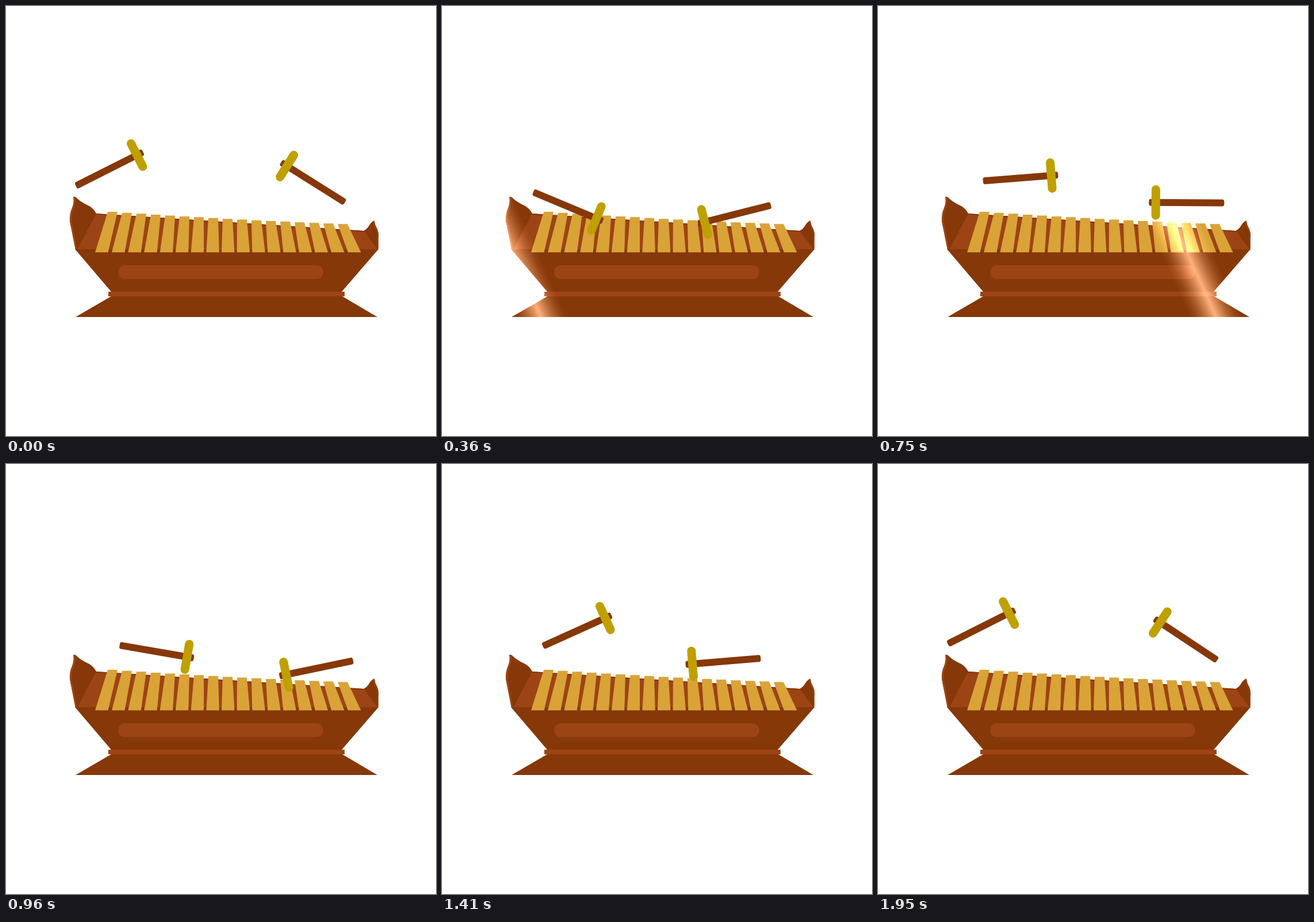
Animation of 748x748 px, one loop 2.25 s. Source, as an HTML page with a canvas:

```html
<!DOCTYPE html>
<html lang="en">
<head>
<meta charset="utf-8">
<title>Wooden xylophone</title>
<style>
html, body { margin: 0; width: 100%; height: 100%; overflow: hidden; background: #fff; }
canvas { display: block; }
</style>
</head>
<body>
<canvas id="stage" width="748" height="748"></canvas>
<script>
const ctx = document.getElementById('stage').getContext('2d');
const DARK = '#863809', LIGHT = '#9d4414', GOLD = '#d9a338', HEAD = '#bfa000';
const LOOP = 2250, END = 1950, STEP = 30;

// Turning points of each mallet: time, grip x, grip y, angle in degrees
const leftSwing = [
  [0, 121.5, 313, -26.8], [435, 162, 324.5, 27], [805, 184, 303, -6.5],
  [1120, 212, 328, 27], [1590, 157.5, 311.5, -49.3], [END, 121.5, 313, -26.8]
];
const rightSwing = [
  [-40, 590, 341.5, 33.6], [345, 572, 346.5, -14.3], [675, 602, 342.5, 2.2],
  [1020, 604, 342, -13], [1235, 574.5, 341.5, 13], [1380, 554, 338, -5],
  [END, 590, 341.5, 33.6]
];

// Ease in and out between neighbouring turning points
function poseAt(swing, t) {
  const next = Math.max(1, swing.findIndex(p => p[0] >= t));
  const a = swing[next - 1], b = swing[next];
  const u = (t - a[0]) / (b[0] - a[0]), ease = u * u * (3 - 2 * u);
  return a.map((v, i) => v + (b[i] - v) * ease);
}

function fill(path, color) {
  ctx.fillStyle = color;
  ctx.fill(new Path2D(path));
}

function stroke(path, color, width) {
  ctx.strokeStyle = color;
  ctx.lineWidth = width;
  ctx.stroke(new Path2D(path));
}

function pill(x, y, w, h, r, color) {
  ctx.fillStyle = color;
  ctx.beginPath();
  ctx.roundRect(x, y, w, h, r);
  ctx.fill();
}

// Evenly spaced bars that fan outwards from the middle one
function drawBars() {
  for (let i = 0; i < 17; i++) {
    const k = i - 8;
    const x = 177 + 25 * i, y = 358 + 1.7 * i - 0.023 * i * i;
    const foot = x - 2 + 1.6 * k + 0.014 * k ** 3;
    fill(`M${x} ${y}h17L${foot + 22.5} 428.5h-22.5Z`, GOLD);
  }
}

function drawBody() {
  fill('M156 361L622 391L636 396L648 424H121Z', LIGHT);
  stroke('M157 362L622 392', DARK, 2);
  fill('M117 332Q121 331 124 335Q130 341 145 348Q153 353 157 361L124 424H121' +
    'L111 375Q110 362 115 351Q119 341 117 332Z', DARK);
  stroke('M119 333Q120 342 117 351Q112 362 113 375L122 423', LIGHT, 3);
  fill('M640.5 373Q641 381 645 386Q649 394 648 404L647 424L622 391Q628 388 631 383Q634 377 640.5 373Z', DARK);
  stroke('M640 374Q641 381 644 387Q648 394 647 404V422', LIGHT, 2);
  fill('M120 423H648L584 497H183Z', DARK);
  fill('M183 505H585L646 541H121Z', DARK);
  fill('M178 497H589V505H178Z', LIGHT);
  pill(195, 451, 357, 24, 12, LIGHT);
  drawBars();
}

// Diagonal glint; additive light leaves the white backdrop unchanged
function drawShine(t) {
  const x = 172 + 1.067 * (t - 360), half = 46;
  const glow = ctx.createLinearGradient(-half, 0, half, 0);
  for (let p = 0; p <= 1; p += 0.125) {
    const alpha = 0.48 * (1 - Math.abs(2 * p - 1)) ** 1.5;
    glow.addColorStop(p, `rgba(255,250,235,${alpha})`);
  }
  ctx.save();
  ctx.globalCompositeOperation = 'lighter';
  ctx.transform(1, 0, 0.45, 1, x, 541);
  ctx.fillStyle = glow;
  ctx.fillRect(-half, -220, 2 * half, 225);
  ctx.restore();
}

function drawMallet(swing, t, side) {
  const [, x, y, angle] = poseAt(swing, t);
  ctx.save();
  ctx.translate(x, y);
  ctx.rotate(angle * Math.PI / 180);
  ctx.scale(side, 1);
  pill(0, -6, 131, 12, 3.5, DARK);
  pill(111.5, -30, 15, 60, 7.5, HEAD);
  ctx.restore();
}

function frame(now) {
  const t = Math.min(END, Math.floor(now % LOOP / STEP) * STEP);
  ctx.fillStyle = '#fff';
  ctx.fillRect(0, 0, 748, 748);
  drawBody();
  drawShine(t);
  drawMallet(leftSwing, t, 1);
  drawMallet(rightSwing, t, -1);
  requestAnimationFrame(frame);
}
frame(0);
</script>
</body>
</html>
```
